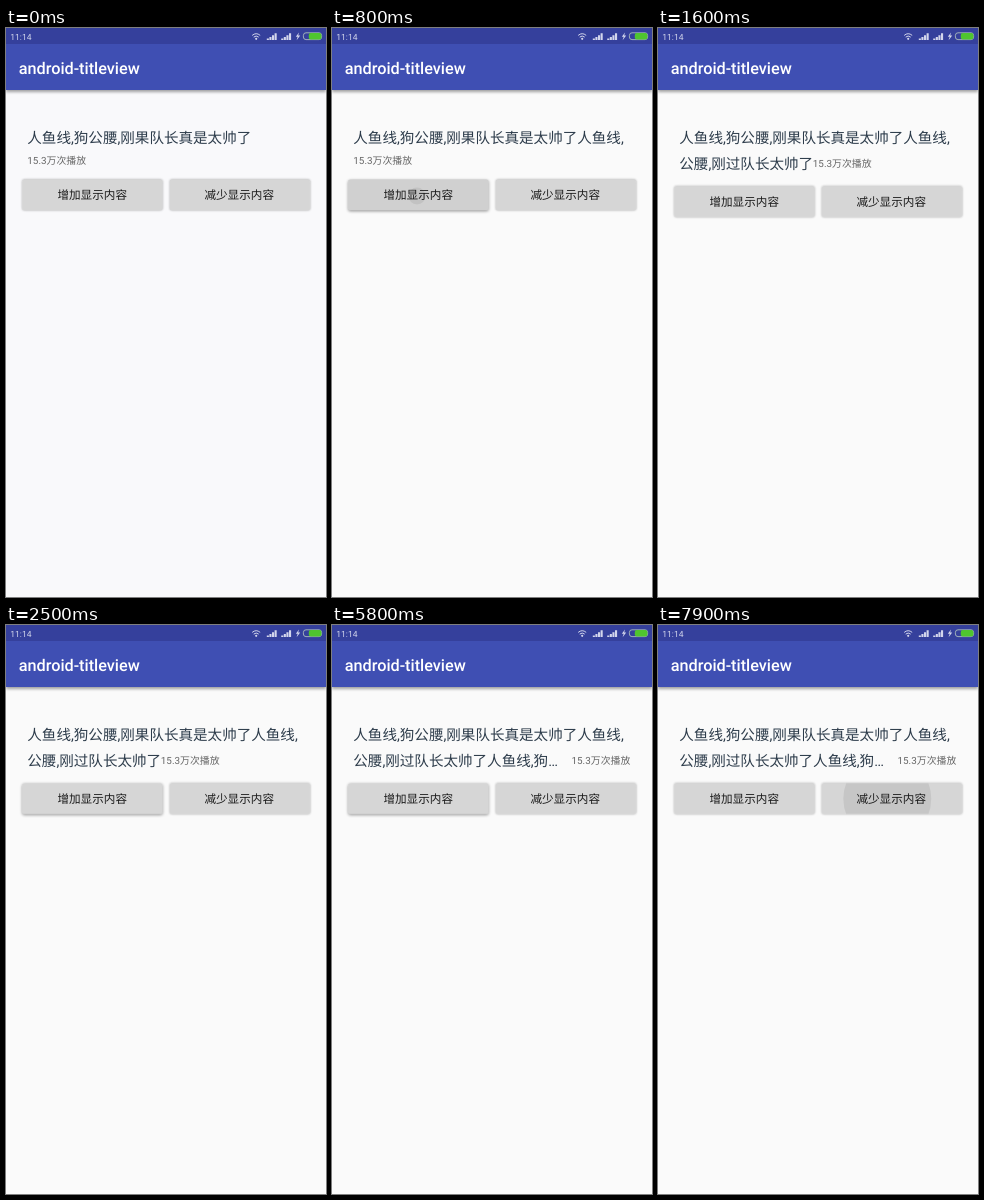
Write an HTML page that moves like this. It is 320 px wide and 569 px high and loops after 8 s.

```html
<!DOCTYPE html>
<html lang="zh-CN">
<head>
<meta charset="utf-8">
<title>android-titleview</title>
<style>
  html, body { margin: 0; width: 100%; height: 100%; overflow: hidden; background: #fafafa; }
  svg { display: block; width: 320px; height: 569px; }
  text { font-family: Roboto, "Noto Sans CJK SC", "Noto Sans CJK", sans-serif; text-rendering: geometricPrecision; }
  .line { font-size: 14.55px; fill: #2d3c4b; }
  .plays { font-size: 9.9px; fill: #666; }
  .label { font-size: 11.6px; font-weight: 500; fill: #191919; text-anchor: middle; }
  .face { fill: #d6d6d6; }
  .ripple, .tint { opacity: 0; }
  .bar { filter: drop-shadow(0 2px 1.8px rgba(0,0,0,.36)); }
</style>
</head>
<body>
<svg viewBox="0 0 320 569">
  <defs>
    <rect id="box" y="151.6" width="140.3" height="30.6" rx="1.7"/>
    <clipPath id="clip1"><use href="#box" x="16.2"/></clipPath>
    <clipPath id="clip2"><use href="#box" x="163.8"/></clipPath>
    <path id="signal" d="M0 12V10.6h2.1V12zM2.6 12V9h2.1v3zM5.2 12V7.2h2.1V12zM7.8 12V5.2h2.1V12z"/>
  </defs>
  <rect id="page" width="320" height="569" fill="#fafafa"/>

  <rect class="bar" width="320" height="62" fill="#3f4fb3"/>
  <rect width="320" height="16" fill="#35409c"/>
  <g fill="#d3d6ec">
    <text x="4.3" y="12" font-size="8.5">11:14</text>
    <path d="M246.2 7.4Q250.2 4 254.2 7.4M247.7 9.1Q250.2 7 252.7 9.1" fill="none" stroke="#d3d6ec"/>
    <circle cx="250.2" cy="10.8" r="1.1"/>
    <use href="#signal" x="260.8"/>
    <use href="#signal" x="275.2"/>
    <path d="M293 4.4L289.8 8.8H291.7L290.6 12.2L294.2 7.6H292.2z"/>
  </g>
  <rect x="297.4" y="4.8" width="18.2" height="6.8" rx="2.6" fill="#35409c" stroke="#b9cbbf" stroke-width=".8"/>
  <rect x="302.8" y="4.9" width="12.6" height="6.6" rx="2" fill="#4fc52f"/>
  <text x="12.7" y="46" font-size="16.25" font-weight="500" fill="#fff">android-titleview</text>

  <text class="line" x="21.3" y="115.2">人鱼线,狗公腰,刚果队长真是太帅了<tspan id="more">人鱼线,</tspan></text>
  <text id="one" class="plays" x="21.3" y="135.8">15.3万次播放</text>
  <g id="two">
    <text class="line" x="21.3" y="140.9">公腰,刚过队长太帅了</text>
    <text class="plays" x="154.8" y="139">15.3万次播放</text>
  </g>
  <g id="full">
    <text class="line" x="21.3" y="140.9">公腰,刚过队长太帅了人鱼线,狗…</text>
    <text class="plays" x="239.5" y="139">15.3万次播放</text>
  </g>

  <g id="buttons">
    <use id="face1" class="face" href="#box" x="16.2"/>
    <use id="face2" class="face" href="#box" x="163.8"/>
    <use id="tint1" class="tint" href="#box" x="16.2"/>
    <use id="tint2" class="tint" href="#box" x="163.8"/>
    <g clip-path="url(#clip1)"><circle id="ripple1" class="ripple" cx="85" cy="168"/></g>
    <g clip-path="url(#clip2)"><circle id="ripple2" class="ripple" cx="229.3" cy="167"/></g>
    <text class="label" x="86.2" y="171.2">增加显示内容</text>
    <text class="label" x="233.2" y="171.2">减少显示内容</text>
  </g>
</svg>
<script>
  const LOOP = 8000, STEP = 100;

  // Samples a rule style(t) once per step and holds each value.
  function play(id, style) {
    const frames = Array.from({ length: LOOP / STEP }, (_, i) =>
      ({ offset: i * STEP / LOOP, easing: 'step-end', ...style(i * STEP) }));
    document.getElementById(id).animate(frames, { duration: LOOP, iterations: Infinity });
  }

  const presses = [
    { button: 1, at: 500, hold: 300, fade: 500 },
    { button: 1, at: 2500, hold: 300, fade: 500 },
    { button: 1, at: 5800, hold: 0, fade: 300 },
    { button: 2, at: 7600, hold: 200, fade: 500 }
  ];
  const firstText = 800, secondLine = 900, overflow = 2800;

  // While held the button is raised and the ripple creeps; on release it spreads and fades.
  function touch(button, t) {
    const p = presses.find(p => p.button === button && t >= p.at && t < p.at + p.hold + p.fade);
    if (!p) return { lift: 0, r: 0, alpha: 0 };
    const age = t - p.at, free = (age - p.hold) / p.fade;
    if (free <= 0) {
      const k = p.hold ? age / p.hold : 0;
      return { lift: 1, r: 8.5 * k, alpha: 0.07 * k };
    }
    return { lift: 0, r: 32 + 60 * free, alpha: 0.075 * (1 - free * free) };
  }

  const show = (id, from, to = LOOP) =>
    play(id, t => ({ visibility: t >= from && t < to ? 'visible' : 'hidden' }));

  show('more', firstText);
  show('one', 0, secondLine);
  show('two', secondLine, overflow);
  show('full', overflow);
  play('page', t => ({ fill: t < 500 ? '#f9f9fb' : '#fafafa' }));
  play('buttons', t => ({ transform: `translateY(${t < secondLine ? 0 : 6.7}px)` }));

  for (const n of [1, 2]) {
    play('face' + n, t => {
      const k = touch(n, t).lift;
      return { filter: `drop-shadow(0 ${0.8 + 0.7 * k}px ${0.8 + k}px rgba(0,0,0,${0.32 + 0.1 * k}))` };
    });
    play('tint' + n, t => {
      const { lift, alpha } = touch(n, t);
      return { opacity: lift * alpha * 0.4 };
    });
    play('ripple' + n, t => {
      const { r, alpha } = touch(n, t);
      return { r: r + 'px', opacity: alpha };
    });
  }
</script>
</body>
</html>
```
